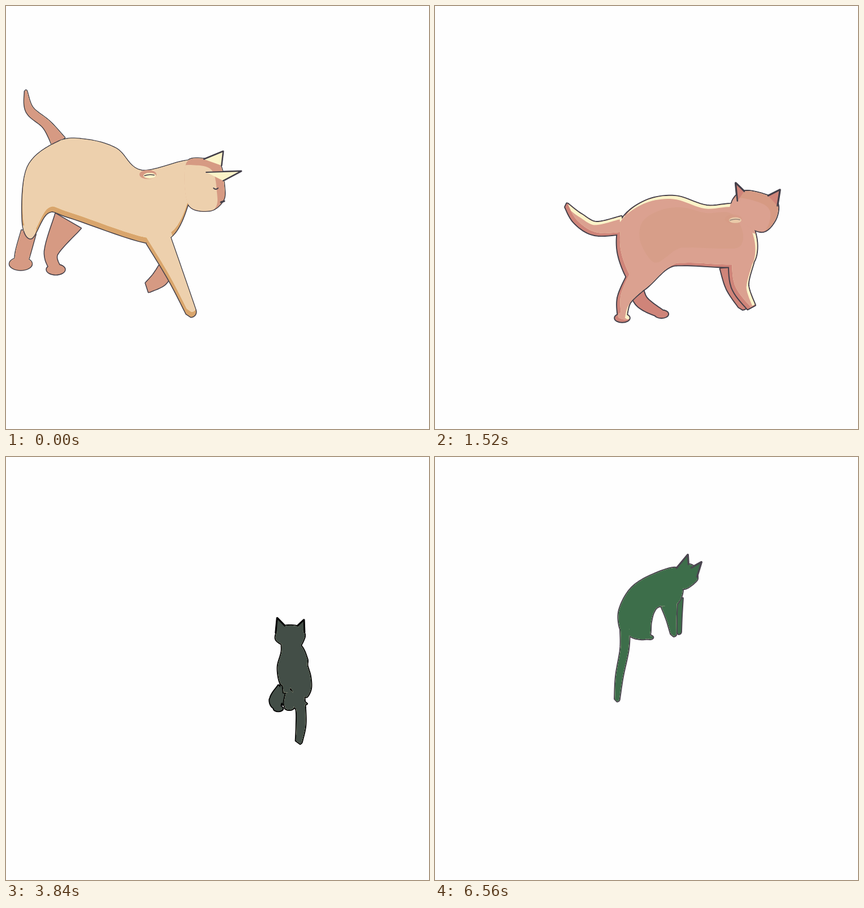
These frames come from a looping animation (748x748 px, 6.64 s). An HTML page with a canvas:

```html
<!DOCTYPE html>
<html lang="en">
<head>
<meta charset="utf-8">
<title>Walking cat</title>
<style>
html, body { margin: 0; width: 100%; height: 100%; overflow: hidden; background: #fefefe; }
canvas { display: block; width: 748px; height: 748px; }
</style>
</head>
<body>
<canvas id="stage" width="748" height="748"></canvas>
<script>
const LOOP = 6640, STEP = 80, STRIDE = 16;
const PINK = '#d69a83', CREAM = '#fbf3c8', TAN = '#d9a56c';
const LIMBS = ['tail', 'hind', 'hindFar', 'fore', 'foreFar'];

// Key poses. Body, head and ears are outline points (x y); limbs are spine points (x y radius).
// A far leg that is left out hides behind the near one.
const poses = [
  {
    t: 0, fill: '#edd0ad', ink: '#433f49', far: PINK, ear: CREAM, shadeColor: TAN, width: 2, ease: 1.8, bump: [0, 12, 1],
    body: '92 240 140 236 195 252 240 291 335 275 320 356 292 408 245 418 112 374 74 366 45 411 29 380 38 285',
    head: '318 279 350 270 378 280 386 318 384 344 360 362 322 350',
    ears: '350 271 384 257 381 282 354 294 416 292 384 309',
    tail: '93 240 13 72 210 8 42 184 7 35 151 2',
    hind: '40 400 13 30 436 13 26 456 11', hindFar: '110 380 26 80 435 12 88 466 9',
    fore: '268 410 22 300 478 14 327 541 9', foreFar: '282 465 13 272 482 14 252 497 9',
    shade: '1 -9', light: '0 0', mark: '251 300', coat: '1 1 13 1 0'
  },
  {
    t: 960, fill: '#edd0ad', ink: '#433f49', far: PINK, ear: PINK, shadeColor: PINK, width: 2.8, ease: 1, bump: [24, 18, 1.8],
    body: '250 337 312 302 375 305 440 342 515 355 525 412 517 445 473 450 375 438 333 438 275 492 243 468 220 408',
    head: '496 350 511 322 563 333 580 350 568 383 545 398 512 385',
    ears: '498 344 495 303 512 322 563 333 588 324 578 354',
    tail: '248 352 17 165 329 14 115 255 11 89 183 2',
    hind: '258 470 20 224 502 14 199 537 9', hindFar: '275 490 14 296 521 12 325 545 7',
    fore: '497 445 22 497 490 16 524 535 8',
    shade: '10 -8', light: '-6 10', mark: '486 380', coat: '0 0 26 1 0'
  },
  {
    t: 2160, fill: '#c66b6e', ink: '#433f49', width: 2.3, ease: 1, bump: [0, 6, 1],
    body: '386 395 405 365 445 344 490 338 530 324 580 375 575 440 530 447 480 454 462 467 430 490 414 470 402 425',
    head: '520 325 548 306 582 311 600 325 602 348 580 373 540 350',
    ears: '540 318 537 297 550 307 582 311 598 299 600 325',
    tail: '392 400 14 384 440 9 374 487 9 361 520 6',
    hind: '432 478 20 421 510 10 438 541 5', hindFar: '405 440 8 408 492 10 457 517 6',
    fore: '556 425 23 554 470 14 570 502 7', foreFar: '517 455 16 523 475 10 523 494 8',
    coat: '0 0 0 0 1'
  },
  {
    t: 3120, fill: '#4d474d', ink: '#050505', width: 2.6, ease: 1.3, bump: [80, 0, 3],
    body: '438 443 434 415 448 389 482 375 505 355 531 402 531 440 510 446 504 462 495 482 478 490 464 474 448 470',
    head: '486 370 502 348 538 348 545 365 544 380 530 401 500 385',
    ears: '488 358 490 333 503 348 537 348 549 341 545 364',
    tail: '454 468 11 449 492 8 437 518 7 433 543 5',
    hind: '482 475 19 483 502 11 499 521 4', hindFar: '444 465 10 435 492 11 454 525 4',
    fore: '521 430 12 519 465 10 527 500 4'
  },
  {
    t: 4480, fill: '#36573f', ink: '#050505', width: 2.2, ease: .8, bump: [-24, 10, 1],
    body: '503 362 470 383 440 350 412 305 388 260 424 242 452 249 480 269 500 293 514 315 521 338 522 358 514 364',
    head: '382 255 384 240 397 235 418 235 424 243 410 262 390 262',
    ears: '381 250 384 223 398 235 406 235 416 220 423 240',
    tail: '514 350 10 532 388 8 548 420 9 545 450 6',
    hind: '475 354 27 448 355 14 428 342 5',
    fore: '402 278 16 387 299 10 365 309 5'
  },
  {
    t: 5280, fill: '#3d6e4a', ink: '#4b4650', width: 2.6, ease: 1, bump: [36, 0, 1.3],
    body: '322 245 337 216 365 204 398 192 420 180 436 207 421 245 392 248 375 247 362 254 352 274 334 277 325 262',
    head: '411 180 416 170 437 171 447 174 446 188 436 206 415 195',
    ears: '410 178 415 157 422 171 427 167 432 156 438 172',
    tail: '324 245 7 315 270 5.5 316 302 7 313 327 5',
    hind: '345 255 18 343 277 9 357 287 4',
    fore: '402 235 13 401 262 10 407 279 5', foreFar: '418 235 10 416 258 7 425 274 4'
  },
  {
    t: 6560, fill: '#3d6e4a', ink: '#4b4650', width: 2.6, ease: 1, bump: [0, 0, 1],
    body: '327 302 326 270 347 232 385 208 430 197 438 236 425 262 397 264 387 274 382 292 378 319 356 321 338 312',
    head: '427 197 448 190 460 196 464 210 461 220 440 233 425 215',
    ears: '427 197 447 173 448 190 453 196 471 186 463 212',
    tail: '336 305 8 335 340 7 326 388 6 322 428 4',
    hind: '360 300 18 364 310 11 380 319 3',
    fore: '414 262 14 418 285 9 422 312 5', foreFar: '429 250 9 430 282 6 431 309 4'
  }
];

for (const pose of poses) {
  pose.hindFar ||= pose.hind;
  pose.foreFar ||= pose.fore;
  for (const color of ['far', 'ear', 'shadeColor']) pose[color] ||= pose.fill;
  pose.shade ||= '0 0';
  pose.light ||= '0 0';
  pose.mark ||= '539 350';
  pose.coat ||= '0 0 0 0 0'; // limb tint, face, crown, shoulder mark, flank
}

const lerp = (a, b, p) => a + (b - a) * p;

function mixColor(a, b, p) {
  const channel = (hex, i) => parseInt(hex.slice(i, i + 2), 16);
  return `rgb(${[1, 3, 5].map(i => Math.round(lerp(channel(a, i), channel(b, i), p)))})`;
}

const numbers = text => text.split(' ').map(Number);

function mixNumbers(a, b, p) {
  const to = numbers(b);
  return numbers(a).map((n, i) => lerp(n, to[i], p));
}

function group(list, size) {
  return Array.from({ length: list.length / size }, (_, i) => list.slice(i * size, i * size + size));
}

// Catmull-Rom in any number of dimensions
function spline(nodes, closed) {
  const n = nodes.length, out = [];
  const at = i => closed ? nodes[(i + n) % n] : nodes[Math.max(0, Math.min(n - 1, i))];
  for (let i = 0; i < (closed ? n : n - 1); i++) {
    const [a, b, c, d] = [-1, 0, 1, 2].map(k => at(i + k));
    for (let u = 0; u < 1; u += .1) {
      out.push(b.map((v, j) => v + .5 * u * (c[j] - a[j] +
        u * (2 * a[j] - 5 * v + 4 * c[j] - d[j] + u * (3 * v - a[j] - 3 * c[j] + d[j])))));
    }
  }
  if (!closed) out.push(nodes[n - 1]);
  return out;
}

// Closed path, always wound the same way so that overlapping parts merge
function shape(pts) {
  const area = pts.reduce((sum, [x, y], i) => {
    const [u, v] = pts[(i + 1) % pts.length];
    return sum + x * v - u * y;
  }, 0);
  const path = new Path2D();
  (area < 0 ? [...pts].reverse() : pts).forEach(([x, y]) => path.lineTo(x, y));
  path.closePath();
  return path;
}

// Tapered tube with a round end
function limb(nodes) {
  const spine = spline(nodes), left = [], right = [];
  let angle;
  spine.forEach(([x, y, r], i) => {
    const a = spine[Math.max(0, i - 1)], b = spine[Math.min(spine.length - 1, i + 1)];
    angle = Math.atan2(b[1] - a[1], b[0] - a[0]);
    left.push([x + r * Math.sin(angle), y - r * Math.cos(angle)]);
    right.unshift([x - r * Math.sin(angle), y + r * Math.cos(angle)]);
  });
  const [x, y, r] = spine[spine.length - 1], cap = [];
  for (let k = -4; k <= 4; k++) {
    const turn = angle + k * Math.PI / 8;
    cap.push([x + r * Math.cos(turn), y + r * Math.sin(turn)]);
  }
  return shape([...left, ...cap, ...right]);
}

function oval(x, y, rx, ry) {
  const path = new Path2D();
  path.ellipse(x, y, rx, ry, 0, 0, 7);
  return path;
}

function merge(...paths) {
  const all = new Path2D();
  paths.forEach(path => all.addPath(path));
  return all;
}

const ctx = document.getElementById('stage').getContext('2d');
ctx.lineCap = ctx.lineJoin = 'round';

function fill(path, color) {
  ctx.fillStyle = color;
  ctx.fill(path);
}

function stroke(path, color, width) {
  ctx.strokeStyle = color;
  ctx.lineWidth = width;
  ctx.stroke(path);
}

function layer(alpha, paint) {
  if (alpha < .01) return;
  ctx.save();
  ctx.globalAlpha = Math.min(1, alpha);
  paint();
  ctx.restore();
}

function poseAt(t) {
  let i = poses.length - 1;
  while (poses[i].t > t) i--;
  const a = poses[i], b = poses[i + 1] || a;
  const raw = a === b ? 0 : (t - a.t) / (b.t - a.t), p = raw ** a.ease;
  const [bx, by, skew] = a.bump, swing = Math.sin(Math.PI * raw ** skew);
  const step = STRIDE * Math.sin(2 * Math.PI * raw);
  const part = (name, size) => group(mixNumbers(a[name], b[name], p), size)
    .map(([x, y, ...r]) => [x + bx * swing, y + by * swing, ...r]);

  const cat = { width: lerp(a.width, b.width, p) };
  for (const name of ['fill', 'ink', 'far', 'ear', 'shadeColor']) cat[name] = mixColor(a[name], b[name], p);
  for (const name of ['shade', 'light', 'coat']) cat[name] = mixNumbers(a[name], b[name], p);
  for (const name of ['body', 'head', 'ears', 'mark']) cat[name] = part(name, 2);
  for (const name of LIMBS) cat[name] = part(name, 3);
  // Near and far legs swing in opposite directions between the key poses.
  [['hind', 1], ['hindFar', -1], ['fore', -1], ['foreFar', 1]].forEach(([name, side]) =>
    cat[name].forEach((node, j) => node[0] += step * side * j / 2));
  return cat;
}

function drawCat(cat) {
  const body = shape(spline(cat.body, true)), head = shape(spline(cat.head, true));
  const ears = group(cat.ears, 3);
  const [tail, hind, hindFar, fore, foreFar] = LIMBS.map(name => {
    const tube = limb(cat[name]), [x, y, r] = cat[name].at(-1);
    return name.startsWith('hind') ? merge(tube, oval(x, y, r * 1.8, r)) : tube;
  });
  const near = merge(tail, hind, fore, body, head, ...ears.map(shape));
  const [tint, face, crown, mark, flank] = cat.coat;
  const line = cat.width * 1.5;

  for (const group of [merge(hindFar, foreFar), near]) {
    stroke(group, cat.ink, line);
    fill(group, group === near ? cat.shadeColor : cat.far);
  }

  // Shade is left at the edges that the shifted copies do not cover.
  layer(1, () => {
    ctx.clip(near);
    ctx.translate(...cat.shade);
    fill(near, CREAM);
    ctx.clip(near);
    ctx.translate(cat.light[0] - cat.shade[0], cat.light[1] - cat.shade[1]);
    fill(near, cat.fill);
  });

  layer(tint, () => {
    const outside = merge(body);
    outside.rect(0, 0, 748, 748);
    ctx.clip(outside, 'evenodd');
    ctx.clip(merge(tail, hind));
    fill(merge(tail, hind), PINK);
    stroke(body, cat.ink, line);
  });

  layer(crown, () => {
    ctx.clip(head);
    fill(head, PINK);
    ctx.translate(-crown, crown * .9);
    fill(head, cat.fill);
  });

  // Pale flank: the body shrunk about its middle
  layer(flank, () => {
    const [x, y] = [0, 1].map(j => cat.body.reduce((sum, pt) => sum + pt[j], 0) / cat.body.length);
    ctx.translate(x + 10, y - 14);
    ctx.scale(.74, .58);
    ctx.translate(-x, -y);
    fill(body, '#d39a82');
  });

  layer(mark, () => {
    const [x, y] = cat.mark[0];
    fill(oval(x, y - 2, 15, 8), PINK);
    fill(oval(x + 3, y, 11, 5), CREAM);
    stroke(new Path2D(`M${x - 6} ${y}q8 -3 17 -1`), cat.ink, 1.6);
  });

  for (const [base, tip, end] of ears) {
    fill(shape([base, tip, end]), cat.ear);
    stroke(new Path2D(`M${base.slice(0, 2)}L${tip}L${end}`), cat.ink, cat.width);
  }

  layer(face, () => {
    const [x, y] = cat.head[4];
    stroke(new Path2D(`M${x - 17} ${y - 22}q4 4 8 0`), cat.ink, 1.8);
    stroke(new Path2D(`M${x - 4} ${y + 3}l6 -2`), cat.ink, 3);
  });
}

let shown = -1;
function tick() {
  const t = Math.floor(performance.now() % LOOP / STEP) * STEP;
  if (t !== shown) {
    ctx.fillStyle = '#fefefe';
    ctx.fillRect(0, 0, 748, 748);
    drawCat(poseAt(shown = t));
  }
  requestAnimationFrame(tick);
}
tick();
</script>
</body>
</html>
```
